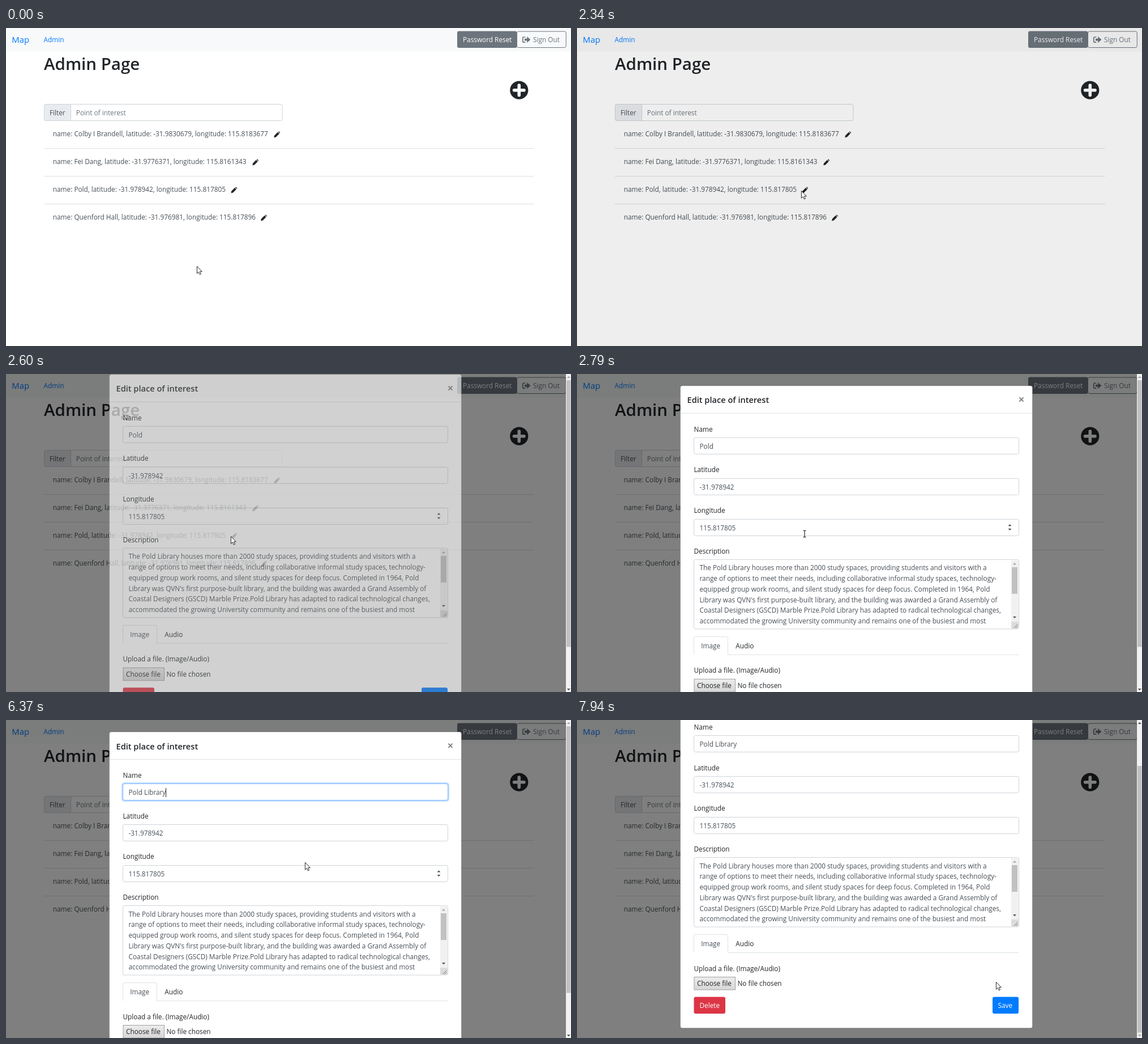
Recreate the animation shown at these times as an HTML page. Size 998 by 561 pixels, loop 8000 ms.

```html
<!DOCTYPE html>
<html lang="en">
<head>
<meta charset="utf-8">
<title>Admin page</title>
<style>
html, body { margin: 0; width: 100%; height: 100%; overflow: hidden; background: #fff; }
svg { display: block; width: 998px; height: 561px; }
text { font: 11.8px "Open Sans", "Noto Sans", sans-serif; fill: #212529; white-space: pre; }
.soft { fill: #495057; }
.muted { fill: #6c757d; }
.link { fill: #007bff; }
.white { fill: #fff; }
.brand { font-size: 14.8px; }
.h1 { font-size: 29.5px; font-weight: 600; }
.title { font-size: 14.6px; font-weight: 600; }
.field { fill: #fff; stroke: #ced4da; }
.rule { stroke: #dee2e6; fill: none; }
.thumb { fill: #c1c1c1; }
.track { fill: #f1f1f1; }
.arrow { fill: #505050; }
.off { fill: #a3a3a3; }
</style>
</head>
<body>
<svg viewBox="0 0 998 561">
  <defs>
    <path id="pencil" fill="#212529" d="M-5.2 5.2L-4.5 1.7L1.4-4.2L4.2-1.4L-1.7 4.5ZM2.2-4.9L2.8-5.4Q3.4-5.7 3.9-5.2L5.2-3.9Q5.7-3.4 5.4-2.8L4.9-2.2Z"/>
    <path id="up" d="M-3 1.5L0-1.7L3 1.5Z"/>
    <path id="down" d="M-3-1.5L0 1.7L3-1.5Z"/>
    <linearGradient id="btn" x2="0" y2="1">
      <stop stop-color="#ededed"/><stop offset="1" stop-color="#d6d6d6"/>
    </linearGradient>
  </defs>

  <g id="page">
    <rect width="998" height="561" fill="#fff"/>
    <rect width="998" height="41.5" fill="#f8f9fa"/>
    <text class="link brand" x="10.3" y="26.3">Map</text>
    <text class="link" x="66.5" y="24.7">Admin</text>
    <rect x="797" y="5.5" width="105.5" height="29.5" rx="3" fill="#6c757d"/>
    <text class="white" x="807" y="24.7">Password Reset</text>
    <rect x="902.5" y="6" width="86.8" height="28.5" rx="3" fill="none" stroke="#6c757d"/>
    <path d="M917.3 16H914.6Q912.8 16 912.8 17.8V23.4Q912.8 25.2 914.6 25.2H917.3" fill="none" stroke="#6c757d" stroke-width="1.7"/>
    <path class="muted" d="M916 18.7H920.3V15L926.4 20.6L920.3 26.2V22.6H916Z"/>
    <text class="muted" x="931" y="24.7">Sign Out</text>
    <text class="h1" x="67" y="73.5">Admin Page</text>
    <circle cx="906.3" cy="109.7" r="16.1" fill="#212529"/>
    <path d="M906.3 101V118.4M897.6 109.7H915" stroke="#fff" stroke-width="5.6" stroke-linecap="round"/>
    <rect class="field" x="67.5" y="134.5" width="420.5" height="29" rx="3"/>
    <path d="M114.5 134.5H70.5Q67.5 134.5 67.5 137.5V160.5Q67.5 163.5 70.5 163.5H114.5Z" fill="#e9ecef" stroke="#ced4da"/>
    <text class="soft" x="77" y="153.6">Filter</text>
    <text class="muted" x="123.8" y="154.4">Point of interest</text>
    <g id="rows"></g>
  </g>

  <rect id="shade" width="998" height="561"/>

  <g id="modal">
    <rect x="182.5" y="21" width="622" height="607.5" rx="3.5" fill="#fff" stroke="#000" stroke-opacity=".2"/>
    <text class="title" x="194.5" y="51.6">Edit place of interest</text>
    <path d="M781.4 41.6L788.6 48.8M788.6 41.6L781.4 48.8" stroke="#7b7b7b" stroke-width="1.8"/>
    <path class="rule" d="M183 69.5H804"/>
    <rect id="ring" x="205.2" y="111.2" width="576.6" height="31.6" rx="4" fill="none" stroke="#bfdeff" stroke-width="2.6"/>
    <g id="fields"></g>
    <rect id="edge" x="206.5" y="112.5" width="574" height="29" rx="3" fill="none" stroke="#80bdff"/>
    <text id="name" class="soft" x="216.5" y="132.4"></text>
    <path id="caret" d="M0 120V136" stroke="#222"/>
    <g id="spin" class="arrow">
      <use href="#up" x="764.5" y="267"/><use href="#down" x="764.5" y="274.5"/>
    </g>
    <text x="206.5" y="317">Description</text>
    <rect class="field" x="206.5" y="327.5" width="574" height="122.5" rx="3"/>
    <g id="story"></g>
    <rect class="track" x="767" y="329" width="12.5" height="108"/>
    <rect class="thumb" x="768" y="341" width="10" height="47"/>
    <use href="#up" class="off" x="773" y="335"/>
    <use href="#down" class="arrow" x="773" y="429.5"/>
    <rect x="767" y="437" width="12.5" height="12" fill="#dcdcdc"/>
    <path d="M771.5 448.5L778.5 441.5M775 448.5L778.5 445" stroke="#6a6a6a" stroke-width=".9"/>
    <path class="rule" d="M206.5 495.5V466Q206.5 463.5 209 463.5H264Q266.5 463.5 266.5 466V495.5H780.5"/>
    <text class="soft" x="219.3" y="483.8">Image</text>
    <text x="280.3" y="483.8">Audio</text>
    <text x="206.5" y="527.7">Upload a file. (Image/Audio)</text>
    <rect x="207" y="538.5" width="72.5" height="22.5" fill="url(#btn)" stroke="#a0a0a0"/>
    <text x="212" y="553.9">Choose file</text>
    <text x="283.4" y="553.9">No file chosen</text>
    <rect x="206.5" y="573.5" width="55.5" height="29.5" rx="3" fill="#dc3545"/>
    <text class="white" x="216.5" y="592.7">Delete</text>
    <rect x="734" y="573.5" width="46" height="29.5" rx="3" fill="#007bff"/>
    <text class="white" x="743.5" y="592.7">Save</text>
  </g>

  <g id="bar">
    <rect class="track" x="989" width="9" height="561"/>
    <rect id="thumb" class="thumb" x="990" y="11" width="7.5" height="470.5"/>
    <use id="barUp" href="#up" x="993.8" y="5.5"/>
    <use id="barDown" href="#down" x="993.8" y="556.5"/>
  </g>

  <path id="pointer" d="M.4.4V13.2L3.3 10.5L5.3 14.9L7.4 14L5.5 9.7H9.3Z" fill="#fff" stroke="#111" stroke-width=".9"/>
  <path id="beam" d="M-2.6-5.7H-.6L0-5.2L.6-5.7H2.6M0-5.4V5.4M-2.6 5.7H-.6L0 5.2L.6 5.7H2.6" fill="none" stroke="#111" stroke-width="1.1"/>
</svg>
<script>
const LOOP = 8000, SCROLL = 85;
const OPEN = 2505, FOCUS = 3530, BLUR = 6900;
const $ = id => document.getElementById(id);
const clamp = v => Math.min(1, Math.max(0, v));
const ramp = (t, start, length) => clamp((t - start) / length);
const smooth = v => v * v * (3 - 2 * v);
const show = (id, on) => $(id).setAttribute('visibility', on ? 'visible' : 'hidden');
const move = (id, x, y) => $(id).setAttribute('transform', `translate(${x} ${y})`);
const label = (x, y, s, c = '') => `<text class="${c}" x="${x}" y="${y}">${s}</text>`;

const rows = [
  ['Colby I Brandell', '-31.9830679', '115.8183677', 478.5],
  ['Fei Dang', '-31.9776371', '115.8161343', 440.5],
  ['Pold', '-31.978942', '115.817805', 402.7],
  ['Quenford Hall', '-31.976981', '115.817896', 455.3]
];
$('rows').innerHTML = rows.map(([name, lat, lng, x], i) => {
  const y = 191 + 49 * i;
  return label(82.8, y, `name: ${name}, latitude: ${lat}, longitude: ${lng}`, 'soft') +
    `<use href="#pencil" x="${x}" y="${y - 3}"/>` +
    (i < 3 ? `<path d="M67 ${y + 21.5}H932.5" stroke="#dfdfdf"/>` : '');
}).join('');

$('fields').innerHTML = [['Name', ''], ['Latitude', '-31.978942'], ['Longitude', '115.817805']]
  .map(([title, value], i) => {
    const y = 71.7 * i;
    return label(206.5, 102 + y, title) +
      `<rect class="field" x="206.5" y="${Math.floor(112.6 + y) + .5}" width="574" height="29" rx="3"/>` +
      label(216.5, 132.4 + y, value, 'soft');
  }).join('');

$('story').innerHTML = [
  'The Pold Library houses more than 2000 study spaces, providing students and visitors with a',
  'range of options to meet their needs, including collaborative informal study spaces, technology-',
  'equipped group work rooms, and silent study spaces for deep focus. Completed in 1964, Pold',
  "Library was QVN's first purpose-built library, and the building was awarded a Grand Assembly of",
  'Coastal Designers (GSCD) Marble Prize.Pold Library has adapted to radical technological changes,',
  'accommodated the growing University community and remains one of the busiest and most'
].map((s, i) => label(216.5, 346.6 + 18.75 * i, s, 'soft')).join('');

// time, x, y
const path = [
  [0, 337, 420], [30, 337, 420], [270, 450, 345], [570, 97, 300], [740, 142, 288],
  [960, 142, 288], [1400, 375, 286], [1790, 392, 289], [1880, 392, 289], [2200, 396, 287],
  [2560, 396, 287], [2720, 402, 282], [2800, 402, 282], [3500, 299, 126], [3800, 307, 128],
  [5770, 307, 128], [6370, 528, 251], [6550, 570, 277], [6610, 570, 277], [6880, 680, 297],
  [7390, 712, 298], [7480, 712, 298], [7900, 740, 462], [LOOP, 740, 462]
];
function mouse(t) {
  const i = path.findIndex(p => p[0] > t);
  const [t0, x0, y0] = path[i - 1], [t1, x1, y1] = path[i];
  const k = smooth((t - t0) / (t1 - t0));
  return [x0 + (x1 - x0) * k, y0 + (y1 - y0) * k];
}

const keys = [4000, 4300, 4500, 4620, 4800, 5000, 5125, 5250];
const within = (v, a, b) => v >= a && v <= b;

function overText(t, x, y, scroll) {
  if (t < OPEN) {
    return rows.some((r, i) => within(x, 83, r[3] - 15) && Math.abs(y - 187 - 49 * i) < 8);
  }
  y += scroll;
  return within(x, 206, 766) &&
    [[112, 142], [184, 213], [256, 286], [328, 450]].some(([a, b]) => within(y, a, b));
}

function draw(t) {
  const scroll = SCROLL * smooth(ramp(t, 7480, 420));
  const slide = 39 * Math.pow(1 - ramp(t, OPEN, 300), 1.7);
  const [x, y] = mouse(t);

  $('shade').setAttribute('opacity', .5 * ramp(t, 2316, 186));
  $('modal').setAttribute('opacity', ramp(t, OPEN, 150));
  move('modal', 0, -slide - scroll);

  show('bar', t >= OPEN);
  move('thumb', 0, scroll / SCROLL * 70);
  $('barUp').setAttribute('class', scroll > 0 ? 'arrow' : 'off');
  $('barDown').setAttribute('class', scroll < SCROLL ? 'arrow' : 'off');

  const glow = ramp(t, FOCUS, 150) - ramp(t, BLUR, 150);
  $('ring').setAttribute('opacity', glow);
  $('edge').setAttribute('opacity', glow);

  const typed = keys.filter(k => k <= t);
  $('name').textContent = 'Pold' + ' Library'.slice(0, typed.length);
  const since = t - (typed.length ? typed[typed.length - 1] : FOCUS);
  const blinkOn = Math.floor(since / 530) % 2 === 0;
  show('caret', within(t, FOCUS, BLUR) && blinkOn);
  move('caret', Math.round(216.5 + $('name').getComputedTextLength()) + .5, 0);
  show('spin', t >= OPEN && within(x, 206, 780) && within(y + scroll, 249, 288));

  const beam = overText(t, x, y, scroll);
  show('beam', beam);
  show('pointer', !beam);
  move('beam', x, y);
  move('pointer', x, y);
}

function tick() {
  draw(performance.now() % LOOP);
  requestAnimationFrame(tick);
}
tick();
</script>
</body>
</html>
```
